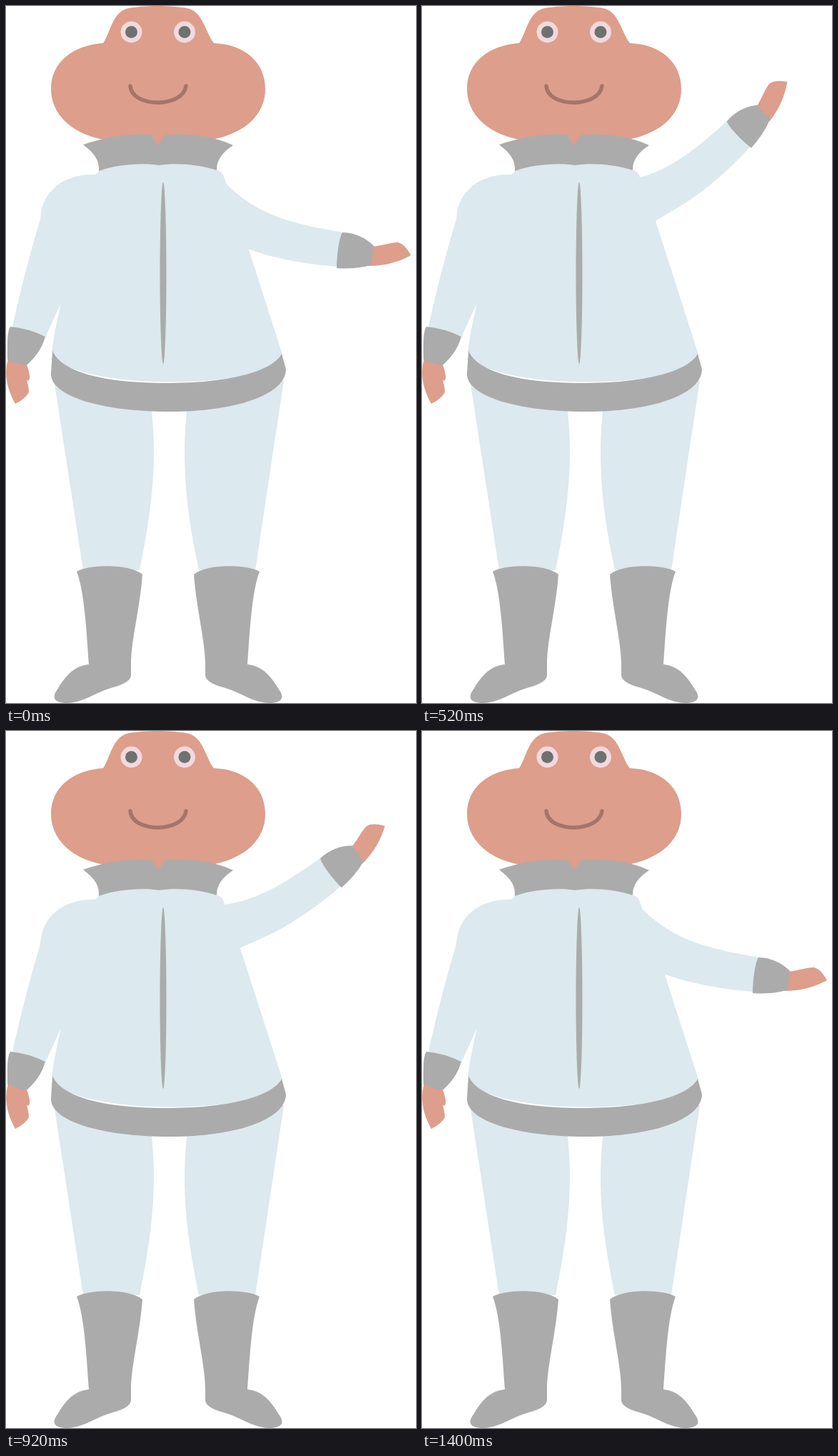
Recreate the animation shown at these times as an HTML page with a canvas. Size 574 by 976 pixels, loop 1.44 s.

```html
<!DOCTYPE html>
<html lang="en">
<head>
<meta charset="utf-8">
<title>Waving figure</title>
<style>
  html, body { margin: 0; width: 100%; height: 100%; overflow: hidden; background: #fff; }
  canvas { display: block; }
</style>
</head>
<body>
<canvas id="stage" width="574" height="976"></canvas>
<script>
const ctx = document.getElementById('stage').getContext('2d');

const SKIN = '#dd9e8c', SUIT = '#dce9ee', GREY = '#ababab';
const EYE = '#f1d9dd', PUPIL = '#6d7270', MOUTH = '#a77467';

const STEP = 40, STEPS = 36, PEAK_STEP = 17, PEAK_ANGLE = 67.5;
const SHOULDER = { x: 288, y: 285 };
const MIRROR_AXIS = 227;

const shapes = {
  head: 'M136 52C146 38 149 7 172 3C195 -1 230 -1 253 3C276 7 279 37 291 52C336 54 363 80 363 116C363 152 335 177 293 186L213 205L131 186C91 177 63 151 63 116C63 80 92 55 136 52Z',
  collar: 'M108 194C145 182 173 179 201 180Q205 181 206 184L213 195L221 183Q223 180 226 180C258 179 290 182 318 195C303 205 295 215 295 230C270 222 240 219 214 223C190 219 155 222 130 231C131 215 123 206 108 194Z',
  body: 'M130 230C155 221 190 219 214 222C240 219 270 221 296 230Q302 232 304 237L309 250L326 298L387 488C375 540 80 540 64 484Q69 448 77 416L55 464L9 450C22 390 37 335 48 299C50 256 85 235 123 236Q128 236 130 230Z',
  zip: 'M220 247C222.5 247 224.5 310 224.5 375C224.5 440 222.5 501 220 501C217.5 501 215.5 440 215.5 375C215.5 310 217.5 247 220 247Z',
  belt: 'M65 483C78 512 135 528 225 528C308 528 372 513 386 487L392 509C391 545 320 568 230 568C130 568 61 545 63 514Z',
  leftLeg: 'M68 529L108 790H187C203 710 213 640 203 560Z',
  rightLeg: 'M389 524L349 790H270C254 715 244 640 254 560Z',
  boot: 'M99 792C115 782 172 780 191 796C188 840 175 890 175 921V937C175 944 165 950 150 954C125 961 110 975 86 976C68 976 63 969 72 957C85 935 97 924 116 922C113 880 110 820 99 792Z',
  leftHand: 'M3 494C-2 512 -1 532 13 557Q26 551 32 541Q32 534 29 524Q32 526 33 522Q34 514 28 500Z',
  leftCuff: 'M6 449Q30 451 55 463C50 480 42 491 29 503Q14 501 2 495C2 475 1 457 6 449Z',
  sleeve: 'M288 240L309 250C348 287 385 303 472 317L465 365C420 362 375 353 341 341L288 321Z',
  cuff: 'M471 317Q497 318 515 336L511 363Q487 369 463 367C463 350 466 325 471 317Z',
  hand: 'M508 337C525 337 535 331 549 331Q558 333 567 349Q540 364 508 364Z',
  smile: 'M174 112C176 143 248 143 252 112'
};
const paths = Object.fromEntries(Object.entries(shapes).map(([name, d]) => [name, new Path2D(d)]));

function fill(color, ...names) {
  ctx.fillStyle = color;
  for (const name of names) ctx.fill(paths[name]);
}

function disc(x, y, radius, color) {
  ctx.fillStyle = color;
  ctx.beginPath();
  ctx.arc(x, y, radius, 0, Math.PI * 2);
  ctx.fill();
}

function drawFace() {
  fill(SKIN, 'head');
  for (const x of [175.5, 250]) {
    disc(x, 36.5, 15, EYE);
    disc(x, 36.5, 8.5, PUPIL);
  }
  ctx.strokeStyle = MOUTH;
  ctx.lineWidth = 5.5;
  ctx.lineCap = 'round';
  ctx.stroke(paths.smile);
}

function drawArm(degrees) {
  ctx.save();
  ctx.translate(SHOULDER.x, SHOULDER.y);
  ctx.rotate(-degrees * Math.PI / 180);
  ctx.translate(-SHOULDER.x, -SHOULDER.y);
  fill(SUIT, 'sleeve');
  fill(SKIN, 'hand');
  fill(GREY, 'cuff');
  ctx.restore();
}

function drawBoots() {
  fill(GREY, 'boot');
  ctx.save();
  ctx.transform(-1, 0, 0, 1, MIRROR_AXIS * 2, 0);
  fill(GREY, 'boot');
  ctx.restore();
}

// Steady swing up, then a slightly slower steady swing back down.
function armAngle(step) {
  const share = step <= PEAK_STEP
    ? step / PEAK_STEP
    : (STEPS - 1 - step) / (STEPS - 1 - PEAK_STEP);
  return PEAK_ANGLE * share;
}

function draw(step) {
  ctx.fillStyle = '#fff';
  ctx.fillRect(0, 0, 574, 976);
  drawFace();
  fill(SUIT, 'leftLeg', 'rightLeg', 'body');
  drawBoots();
  drawArm(armAngle(step));
  fill(SKIN, 'leftHand');
  fill(GREY, 'leftCuff', 'belt', 'zip');
  // Skin shows through the notch of the collar.
  ctx.fillStyle = SKIN;
  ctx.fillRect(200, 180, 26, 16);
  fill(GREY, 'collar');
}

const start = performance.now();
function tick() {
  const elapsed = Math.max(0, performance.now() - start);
  draw(Math.floor(elapsed / STEP) % STEPS);
  requestAnimationFrame(tick);
}
tick();
</script>
</body>
</html>
```
